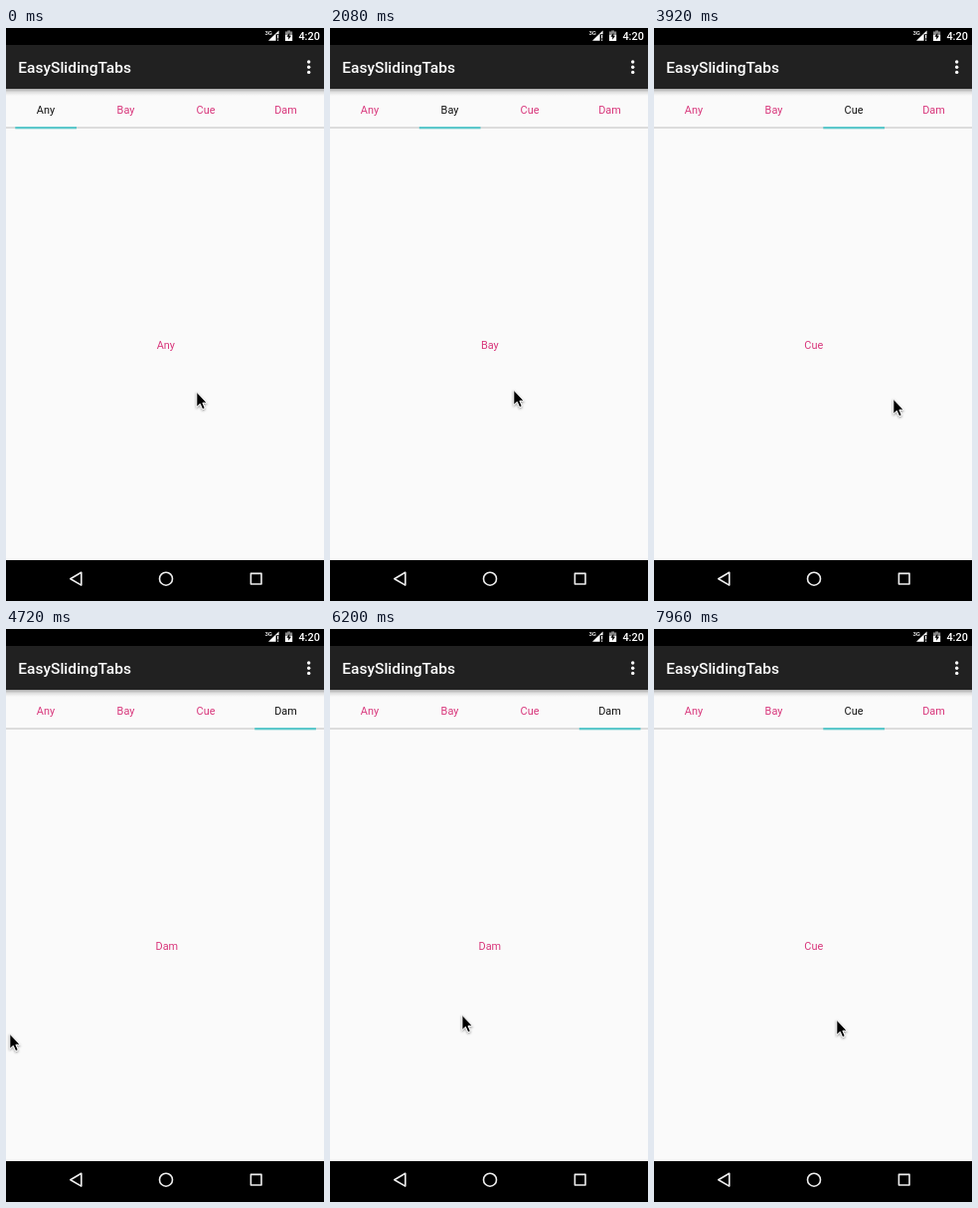
An HTML page that plays this animation: 320 px wide and 575 px high, repeating every 8000 ms.

```html
<!DOCTYPE html>
<html lang="en">
<head>
<meta charset="utf-8">
<title>Sliding tabs</title>
<style>
  html, body { margin: 0; width: 100%; height: 100%; overflow: hidden; background: #000; }
  svg { display: block; width: 100%; height: 100%; }
  text { font-family: Roboto, "Open Sans", sans-serif; font-size: 10.9px; }
  .mid { text-anchor: middle; }
  .pages, .tabs { fill: #d8367b; }
  .bold { font-weight: 500; fill: #fff; }
</style>
</head>
<body>
<svg viewBox="0 0 320 575" preserveAspectRatio="none">
  <defs>
    <linearGradient id="shade" x2="0" y2="1">
      <stop offset="0" stop-opacity=".32"/>
      <stop offset=".5" stop-opacity=".1"/>
      <stop offset="1" stop-opacity="0"/>
    </linearGradient>
    <filter id="soft" x="-50%" y="-50%" width="200%" height="200%">
      <feDropShadow dx="0" dy="1.2" stdDeviation="1" flood-opacity=".4"/>
    </filter>
  </defs>

  <rect width="320" height="575"/>
  <rect y="61" width="320" height="473" fill="#fafafa"/>
  <rect y="99" width="320" height="2" fill="#dcdcdc"/>
  <rect id="bar" y="99" width="61.7" height="2.3" fill="#5cc8cb"/>
  <g id="tabs" class="tabs"></g>
  <g id="pages" class="pages"></g>

  <rect y="17" width="320" height="44" fill="#212121"/>
  <rect y="61" width="320" height="7" fill="url(#shade)"/>
  <text class="bold" x="12.2" y="45" style="font-size:15.56px">EasySlidingTabs</text>
  <g fill="#fff">
    <circle cx="304.7" cy="34" r="1.7"/>
    <circle cx="304.7" cy="39.2" r="1.7"/>
    <circle cx="304.7" cy="44.4" r="1.7"/>
  </g>

  <g transform="translate(0 -.4)">
    <text class="bold" x="260.4" y="7.2" style="font-size:6px">3G</text>
    <path d="M264 13.2L274.6 3V6.6H271.6V13.2Z" fill="#fff"/>
    <path d="M273.6 7.5V11M273.6 11.9V13.2" stroke="#fff" stroke-width="1.2"/>
    <path d="M281 4H283.2V2.8H286V4H288.2V7H281Z" fill="#888"/>
    <path d="M281 7H288.2V13.4H281Z" fill="#fff"/>
    <path d="M285.3 5.2L282.4 9.2H284.2V12.2L287 8.2H285.3Z"/>
    <text class="bold" x="294.4" y="12.6">4:20</text>
  </g>

  <g fill="none" stroke="#eee" stroke-width="1.6" stroke-linejoin="round">
    <path d="M64.8 552.7L75.8 546.3V559.1Z"/>
    <circle cx="161" cy="552.7" r="6.5"/>
    <rect x="246.4" y="547.4" width="10.6" height="10.6"/>
  </g>

  <path id="cursor" d="M.8 .2V15.4L4.3 12.2L6.7 17.6L9.3 16.5L6.9 11.2H11.3Z"
        stroke="#fff" stroke-width="1" filter="url(#soft)"/>
</svg>
<script>
const LOOP = 8000, STEP = 40, LAG = 36;
const PAGE = 320, SLOP = 6, SETTLE = 600;
const names = ["Any", "Bay", "Cue", "Dam"];
const home = { x: 191, y: 365 };

// Pointer moves, each eased from wherever the last one ended
const moves = [
  { start: 40, end: 560, x: 205, y: 365 },
  { start: 720, end: 1200, x: 52, y: 365, to: 1, release: 1096 },
  { start: 1300, end: 1760, x: 184, y: 363 },
  { start: 2080, end: 2440, x: 272, y: 381 },
  { start: 2440, end: 3160, x: 78, y: 374, to: 2, release: 3016 },
  { start: 3200, end: 3840, x: 240, y: 372 },
  { start: 4200, end: 4440, x: 3, y: 406, to: 3, release: 4330 },
  { start: 4720, end: 5260, x: 184, y: 391 },
  { start: 5800, end: 6370, x: 118, y: 386 },
  { start: 6600, end: 7080, x: 270, y: 380, to: 2, release: 6960 },
  { start: 7240, end: 7960, x: 183, y: 392 }
];
const swipes = moves.filter(m => m.release);

const el = id => document.getElementById(id);
const clamp = v => Math.min(1, Math.max(0, v));
const smooth = u => u * u * (3 - 2 * u);

function pointer(t) {
  let { x, y } = home;
  for (const m of moves) {
    const u = smooth(clamp((t - m.start) / (m.end - m.start)));
    x += (m.x - x) * u;
    y += (m.y - y) * u;
  }
  return { x, y };
}

// The page follows the finger until release, then decelerates to rest
function pageAt(t) {
  let page = 0;
  for (const s of swipes) {
    if (t < s.start) break;
    const pull = pointer(s.start).x - pointer(Math.min(t, s.release)).x;
    page += Math.sign(pull) * Math.max(0, Math.abs(pull) - SLOP) / PAGE;
    if (t > s.release) page = s.to + (page - s.to) * (1 - clamp((t - s.release) / SETTLE)) ** 5;
  }
  return page;
}

const selectedAt = t => swipes.reduce((tab, s) => t >= s.release ? s.to : tab, 0);

function addText(parent, label, x, y) {
  const node = document.createElementNS("http://www.w3.org/2000/svg", "text");
  node.setAttribute("class", "mid");
  node.setAttribute("x", x);
  node.setAttribute("y", y);
  node.textContent = label;
  parent.appendChild(node);
  return node;
}

const tabs = names.map((n, i) => addText(el("tabs"), n, 40 + 80.5 * i, 85.8));
names.forEach((n, i) => addText(el("pages"), n, 160.8 + PAGE * i, 321.8));

function draw(t) {
  const selected = selectedAt(t), { x, y } = pointer(t);
  tabs.forEach((node, i) => node.style.fill = i === selected ? "#111" : "");
  el("pages").setAttribute("transform", `translate(${-PAGE * pageAt(t)} 0)`);
  el("bar").setAttribute("x", 9.3 + 80.5 * pageAt(t - LAG));
  el("cursor").setAttribute("transform", `translate(${x} ${y})`);
}

let begin;
function tick(now) {
  begin ??= now;
  draw(Math.floor((now - begin) % LOOP / STEP) * STEP);
  requestAnimationFrame(tick);
}
draw(0);
requestAnimationFrame(tick);
</script>
</body>
</html>
```
